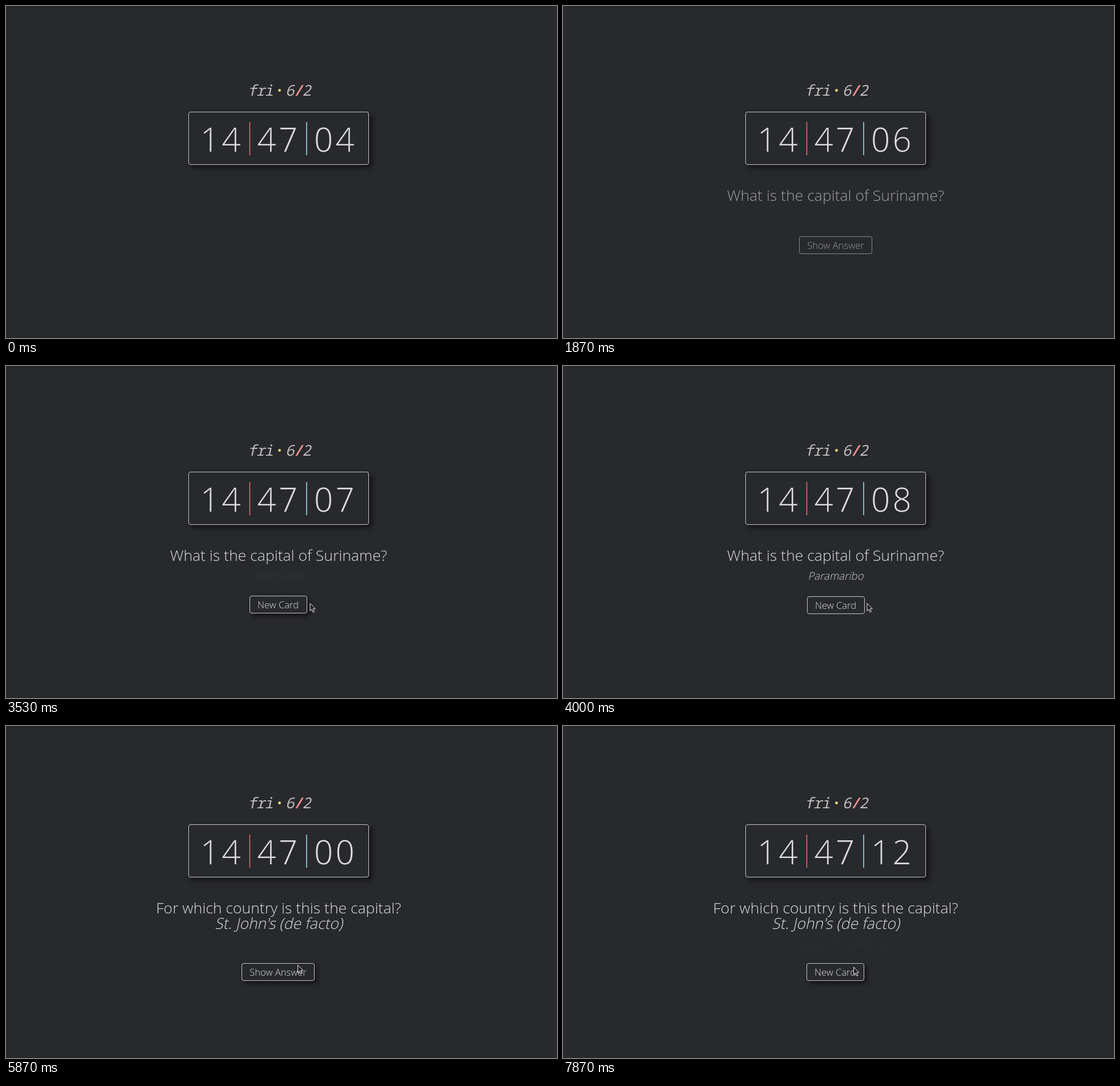
Recreate the animation shown at these times as an HTML page with a canvas. Size 964 px wide and 581 px high, loop 8000 ms.

```html
<!DOCTYPE html>
<html lang="en">
<head>
<meta charset="utf-8">
<title>Clock with flash cards</title>
<style>
html, body { margin: 0; width: 100%; height: 100%; overflow: hidden; background: #28292c; }
canvas { display: block; }
</style>
</head>
<body>
<canvas id="stage" width="964" height="581"></canvas>
<script>
const ctx = document.getElementById('stage').getContext('2d');
const LOOP = 8000, FRAME = 1000 / 15, MID = 477;
const BG = '#28292c', INK = '#dcdcdc', EDGE = '#c6c6c6';
const SANS = '"Open Sans", "Noto Sans", sans-serif';
const MONO = '"Noto Sans Mono", "DejaVu Sans Mono", monospace';

// Moments of the story, in ms
const ASK = 870, ENTER = 2800, REVEAL = 3470, RETURN = 5100, NEXT = 5670, REVEAL2 = 7870;

const ramp = (t, start, length) => Math.min(1, Math.max(0, (t - start) / length));
const easeOut = x => 1 - (1 - x) ** 2.3;

function text(str, x, y, size, { color = INK, alpha = 1, slant = 0, weight = 300, family = SANS } = {}) {
  ctx.save();
  ctx.translate(x, y);
  ctx.transform(1, 0, -slant, 1, 0, 0);
  ctx.globalAlpha = alpha;
  ctx.font = `${weight} ${size}px ${family}`;
  ctx.fillStyle = color;
  ctx.textAlign = 'center';
  ctx.fillText(str, 0, 0);
  ctx.restore();
}

function panel(x, y, w, h, alpha, shade, offset) {
  ctx.save();
  ctx.beginPath();
  ctx.roundRect(x, y, w, h, 4);
  ctx.shadowColor = `rgba(0,0,0,${shade})`;
  ctx.shadowOffsetX = ctx.shadowOffsetY = offset;
  ctx.shadowBlur = offset * 2;
  ctx.fillStyle = BG;
  ctx.fill();
  ctx.shadowColor = 'transparent';
  ctx.globalAlpha = alpha;
  ctx.beginPath();
  ctx.roundRect(x + .5, y + .5, w - 1, h - 1, 3.5);
  ctx.strokeStyle = EDGE;
  ctx.stroke();
  ctx.restore();
}

function drawDate(y) {
  const tint = { '·': '#f0dc82', '/': '#f28f95' };
  [...'fri·6/2'].forEach((ch, i) => {
    const step = i - 3;
    text(ch, 478.5 + step * 14.6 + Math.sign(step) * 3.8, y, 26, {
      color: tint[ch] || '#bcbcba', family: MONO,
      weight: tint[ch] ? 600 : 300, slant: step ? .22 : 0
    });
  });
}

// The new digit slides down from above and pushes the old one out
function digit(now, old, x, y, p) {
  const size = 58, shift = size * (p - 1);
  text(now, x, y + shift, size);
  if (p < 1) text(old, x, y + shift + size, size);
}

function drawClock(t, top) {
  const sec = t < ASK ? 4 : 5 + Math.floor((t - ASK) / 1000);
  const roll = start => easeOut(ramp(t, start, 660));
  panel(319, top, 316, 93, 1, .55, 5);
  ctx.save();
  ctx.beginPath();
  ctx.rect(319, top + 18, 316, 58);
  ctx.clip();
  [14, 47, sec].forEach((n, i) => {
    const x = 375.3 + i * 99.5, live = i === 2;
    const tens = Math.floor(n / 10), units = n % 10;
    digit(tens, 0, x - 18.7, top + 69.5, live && tens ? roll(5870) : 1);
    digit(units, 4, x + 18.7, top + 69.5, live && n === 5 ? roll(ASK) : 1);
  });
  ctx.fillStyle = '#ea6b76';
  ctx.fillRect(425.75, top, 1.5, 93);
  ctx.fillStyle = '#9fe3f2';
  ctx.fillRect(525.25, top, 1.5, 93);
  ctx.restore();
}

function drawButton(label, w, top, alpha, hover) {
  const x = Math.round(MID - w / 2) - hover, y = top - hover;
  panel(x, y, w, 31, alpha, .55 * hover, 4);
  text(label, MID - hover, y + 21.5, 16.6, { alpha });
}

function drawFirstCard(t) {
  const fade = ramp(t, ASK - 20, 1550);
  text('What is the capital of Suriname?', MID, 341, 26.5, { alpha: fade });
  if (t < REVEAL) {
    // The button stays dim until the pointer rests on it
    const alpha = Math.min(fade, .62) + .38 * ramp(t, 2930, 140);
    if (fade) drawButton('Show Answer', 128, 403, alpha, ramp(t, 2860, 70));
  } else {
    const alpha = ramp(t, REVEAL - 40, 570);
    text('Paramaribo', MID, 374, 18.6, { alpha, slant: .22, color: '#cccccc' });
    const hover = 1 - ramp(t, REVEAL, 200) + ramp(t, RETURN + 80, 150);
    drawButton('New Card', 101, 403, 1, hover);
  }
}

function drawSecondCard(t) {
  text('For which country is this the capital?', MID, 328, 26.5);
  text("St. John's (de facto)", MID, 355, 26.5, { slant: .22 });
  if (t < REVEAL2) {
    drawButton('Show Answer', 128, 416, 1, 1);
  } else {
    const alpha = .04 + ramp(t, REVEAL2, 1550);
    text('Antigua and Barbuda', MID, 387, 18.6, { alpha, slant: .22 });
    drawButton('New Card', 101, 416, 1, 1);
  }
}

const arrow = new Path2D('M.5 .8V14L3.5 11.2L5.7 16.4L7.9 15.4L5.7 10.4L9.7 10.2Z');

function drawPointer(t) {
  if (t < ENTER - 70) return;
  const enter = ramp(t, ENTER, 130), back = ramp(t, RETURN, 233);
  ctx.save();
  ctx.translate(
    535 - 3.5 * enter - 21.5 * back - 2 * ramp(t, 6400, 130),
    467 - 52.5 * enter + 3 * back + 3.5 * ramp(t, 6670, 130)
  );
  ctx.fillStyle = '#1c1c1e';
  ctx.strokeStyle = '#eeeeee';
  ctx.fill(arrow);
  ctx.stroke(arrow);
  ctx.restore();
}

function draw(t) {
  ctx.fillStyle = BG;
  ctx.fillRect(0, 0, 964, 581);
  ctx.fillStyle = '#232427';
  ctx.fillRect(0, 0, 964, 1);
  ctx.fillStyle = '#2e1f2b';
  ctx.fillRect(0, 580, 964, 1);
  const second = t >= NEXT, lift = second ? 13 : 0;
  drawDate(156.5 - lift);
  drawClock(t, 185 - lift);
  if (second) drawSecondCard(t); else drawFirstCard(t);
  drawPointer(t);
}

const start = performance.now();
function play() {
  const t = (performance.now() - start) % LOOP;
  // Screen refresh of 15 per second, rounded to 10 ms
  draw(Math.round(Math.floor(t / FRAME) * FRAME / 10) * 10);
  requestAnimationFrame(play);
}
play();
</script>
</body>
</html>
```
